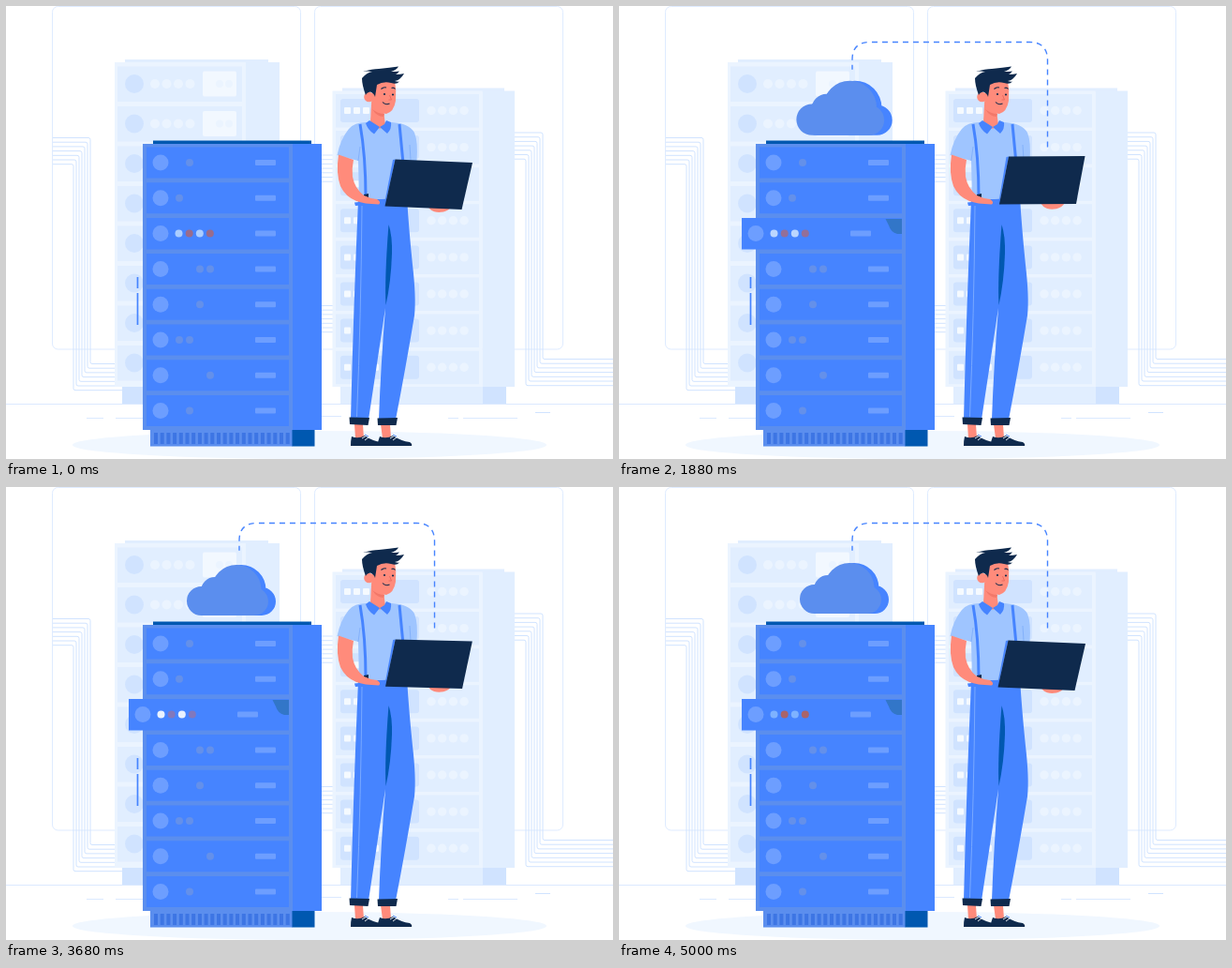
Write an HTML page with a canvas that moves like this. It is 648 px wide and 483 px high and loops after 5040 ms.

```html
<!DOCTYPE html>
<html lang="en">
<head>
<meta charset="utf-8">
<title>Server room</title>
<style>
html, body { margin: 0; width: 100%; height: 100%; overflow: hidden; background: #fff; }
canvas { display: block; width: 648px; height: 483px; }
</style>
</head>
<body>
<canvas id="stage" width="648" height="483"></canvas>
<script>
const ctx = document.getElementById('stage').getContext('2d');
const LOOP = 5040, STEP = 40;
const BLUE = '#4684ff', FRAME = '#5b8eee', DEEP = '#0058b0', NAVY = '#0f2a4d';
const SKIN = '#ff8b7b', SHIRT = '#9fc5ff';
const PALE = '#e1eeff', PALER = '#ebf4ff', SOFT = '#d0e3ff';

const clamp = v => Math.max(0, Math.min(1, v));
const mix = (a, b, k) => a + (b - a) * k;
const smooth = u => { u = clamp(u); return u * u * (3 - 2 * u); };
const sineOut = u => Math.sin(clamp(u) * Math.PI / 2);
const blend = (a, b, k) => `rgb(${a.map((v, i) => Math.round(mix(v, b[i], k))).join(',')})`;

function rect(color, x, y, w, h, r = 0) {
  ctx.fillStyle = color;
  ctx.beginPath();
  ctx.roundRect(x, y, w, h, r);
  ctx.fill();
}
function dot(color, x, y, r) {
  ctx.fillStyle = color;
  ctx.beginPath();
  ctx.arc(x, y, r, 0, 7);
  ctx.fill();
}
function shape(color, d) {
  ctx.fillStyle = color;
  ctx.fill(new Path2D(d));
}
function line(color, d, width = 1) {
  ctx.strokeStyle = color;
  ctx.lineWidth = width;
  ctx.stroke(new Path2D(d));
}

function room() {
  for (const x of [50, 330]) {
    ctx.strokeStyle = '#deebff';
    ctx.lineWidth = 1;
    ctx.beginPath();
    ctx.roundRect(x - 0.5, 0.5, 265, 365.5, 6);
    ctx.stroke();
  }
  for (let i = 0; i < 7; i++) {
    const y = 4.7 * i, x = 3 * i;
    line(SOFT, `M50 ${140.5 + y}H${88 - x}q2 0 2 2V${379.5 + y}q0 2 2 2H126`);
    line(SOFT, `M543 ${135 + y}H${571 - x}q2 0 2 2V${374.5 + y}q0 2 2 2H648`);
    line(SOFT, `M336 ${159 + y}H349M336 ${319.5 + y}H349`);
  }
  line('#dbe9ff', 'M0 424.5H648');
  line('#dbe9ff', 'M86 439.5h18M117 439.5h30M336 437.5h22M472 439.5h11M488 439.5h58');
  line(SOFT, 'M565 433.5h16');
  ctx.fillStyle = '#f0f7ff';
  ctx.beginPath();
  ctx.ellipse(324, 468, 253, 15, 0, 0, 7);
  ctx.fill();
}

function leftRack() {
  rect(PALE, 127, 57, 153, 4);
  rect(PALER, 116, 60, 140, 346);
  rect(PALE, 256, 60, 36, 346);
  rect(SOFT, 124, 406, 60, 18);
  for (let i = 0; i < 8; i++) {
    const y = 83 + 42.5 * i;
    rect(PALE, 119, y - 18.5, 133, 37.5);
    dot(SOFT, 137, y, 10);
    for (const x of [159, 171.5, 184, 196.5]) dot(PALER, x, y, 5);
    rect('#f2f8ff', 210, y - 13.5, 36, 27, 2);
    dot(PALER, 228, y, 4);
    dot(PALER, 238, y, 4);
  }
}

function rightRack() {
  rect(PALE, 359, 87.5, 173, 4);
  rect(PALER, 348.5, 90.5, 160, 315.5);
  rect(PALE, 508.5, 90.5, 34.5, 315.5);
  rect(PALE, 357, 406, 152, 18);
  rect(SOFT, 509, 406, 25, 18);
  for (let i = 0; i < 8; i++) {
    const y = 111.5 + 39.1 * i;
    rect(PALE, 352, y - 17.5, 153, 35.5);
    rect(SOFT, 357, y - 12.5, 84, 25, 3);
    for (let k = 0; k < 4; k++) {
      rect('#f5faff', 361 + 10 * k, y - 3.5, 7, 7, 1);
      dot(PALER, 454 + 11.7 * k, y, 4.7);
    }
  }
}

function unit(y) {
  dot('#6d9eff', 165, y, 8.5);
  rect('#6d9eff', 266, y - 3, 22, 6, 1);
}

function frontRack(slide, glow) {
  rect(DEEP, 157, 143.5, 169, 4);
  rect(FRAME, 146, 147, 160, 305);
  rect(BLUE, 306, 147, 31, 305);
  rect(FRAME, 154, 452, 152, 17.5);
  rect(DEEP, 305.5, 452, 24, 17.5);
  for (let i = 0; i < 22; i++) rect('#3d75e4', 158 + 6.7 * i, 455, 4, 12);
  line(BLUE, 'M140.5 289V301M140.5 306V340', 1.7);

  const lamps = [[196], [185], [], [207, 218], [207], [185, 196], [218], [196]];
  lamps.forEach((xs, i) => {
    const y = 167 + 37.8 * i;
    if (i === 2) return;
    rect(BLUE, 150, y - 16.5, 152, 33);
    unit(y);
    xs.forEach(x => dot('#6490ea', x, y, 4));
  });

  const light = blend([118, 173, 255], [255, 255, 255], glow);
  const red = blend([172, 98, 100], [122, 124, 204], glow);
  ctx.save();
  ctx.beginPath();
  ctx.rect(0, 200, 302, 80);
  ctx.clip();
  ctx.translate(-slide, 0);
  rect(BLUE, 150, 226, 180, 33.5);
  shape('#3276c8', 'M303.5 227H330V243H316Q309 241 307 234Z');
  unit(242.5);
  [184.5, 195.7, 206.8, 217.8].forEach((x, i) => dot(i % 2 ? red : light, x, 242.5, 4));
  ctx.restore();
}

function link(progress) {
  const length = 335 * progress, dashes = [];
  for (let at = 0; at < length; at += 11) dashes.push(Math.min(6, length - at), 5);
  if (!dashes.length) return;
  dashes[dashes.length - 1] = 999;
  ctx.setLineDash(dashes);
  line(BLUE, 'M457.5 150.5V58Q457.5 38.5 438 38.5H268Q249 38.5 249 57V70', 1.4);
  ctx.setLineDash([]);
}

function cloudBody(color, dx, right) {
  ctx.fillStyle = color;
  ctx.beginPath();
  ctx.arc(209.5 + dx, 118.5, 15.5, 0, 7);
  ctx.closePath();
  ctx.moveTo(239 + dx, 108);
  ctx.arc(224 + dx, 108, 15, 0, 7);
  ctx.moveTo(273 + dx, 106.5);
  ctx.arc(247 + dx, 106.5, 26.5, 0, 7);
  ctx.moveTo(right, 119);
  ctx.arc(right - 15, 119, 15, 0, 7);
  ctx.rect(209 + dx, 110, right - 224 - dx, 24);
  ctx.fill();
}

function cloud(scale, bob) {
  if (scale <= 0.01) return;
  const grown = clamp((scale - 0.7) / 0.3);
  ctx.save();
  if (grown < 1) ctx.filter = `blur(${(1.3 * (1 - grown)).toFixed(2)}px)`;
  ctx.translate(240, 108 + bob);
  ctx.scale(scale, scale);
  ctx.translate(-241, -107);
  cloudBody(BLUE, 5 * grown, 281 + 8 * grown);
  cloudBody(FRAME, 0, 281);
  ctx.restore();
}

function legs() {
  shape(SKIN, 'M372 446H381L382 461H373ZM400 446H410L411 461H402Z');
  shape(NAVY, 'M369 459Q376 462 383 458Q391 464 401 465Q404 467 403 469H368Q368 463 369 459Z');
  shape(NAVY, 'M399 459Q406 462 413 458Q422 464 431 465Q434 467 433 469H397Q397 463 399 459Z');
  line('#fff', 'M380 461l5 -3M383 463l4 -3M410 461l5 -3M413 463l4 -3', 0.9);
  line(BLUE, 'M383 457l4 2M413 457l4 2', 0.9);
  shape(BLUE, 'M376 207L428 204Q430 237 434 276Q438 310 436 330Q427 384 416 441H398Q400 384 405 322L387 441H368Q371 320 376 207Z');
  shape(DEEP, 'M408.5 233Q412.5 245 412 264Q411 294 405.5 319Q404 290 408.5 233Z');
  line('#79a9ff', 'M380 213Q379 330 374.5 438', 1);
  shape(NAVY, 'M366.5 438.5L388 439L386.5 447L367 446ZM396.5 439.5L418 439L416.5 447H397Z');
}

function body() {
  shape(SHIRT, 'M384 124Q372 124 366 131Q357 142 353.5 159L376 165L377 207L432 204L432 165L438.5 165Q440 145 436 135Q430 125 412 124Z');
  line('#83b1fb', 'M376 165L378 150M432 164L431 148', 1);
  line(BLUE, 'M378 126Q384 160 384 204M420 126L424 168', 3);
  shape(NAVY, 'M382 201l5 -1v5l-5 1Z');
  shape(BLUE, 'M372 209.5L428 204V209L373 213Z');
  shape(SKIN, 'M390 104L403 111L405 127L399 131L389 124Z');
  shape(BLUE, 'M388 122L384 125Q386 132 393 136.5L399 129ZM404 126L399 129L407 136Q412 131 411 124L406 122Z');
}

function head() {
  dot(SKIN, 387.5, 97, 5.3);
  shape(SKIN, 'M392 82L415 80Q417 90 416 101Q414 113 406 115Q395 115 390 104Z');
  shape('#f27869', 'M391 110Q397 115 404 115L403 118Q396 118 391 110Z');
  shape(NAVY, 'M380 77Q385 71 391 70Q385 69 381 70Q391 67 398 67Q410 65.5 419 64.5Q417 68 411 70Q416 70 420 69.5Q418 72 416 73Q421 73 425 72Q421 79 415 80Q418 81 420 80.5Q417 84 411 82Q403 80 396 84L394 97Q393 93 389 91.5Q385 92 384 95Q380 84 380 77Z');
  dot(NAVY, 404, 94, 1.1);
  dot(NAVY, 413, 94.5, 1.1);
  line(NAVY, 'M400.5 88.5Q403 86 406 87M411.5 87.5Q414 86.5 415.5 88.5', 1.1);
  line('#e8695f', 'M409.5 95L411.5 100H408.5', 0.9);
  line(NAVY, 'M402 102.5Q405 106 409.5 104', 1.1);
}

function arm(lift) {
  shape(SKIN, 'M355 158.5Q352 178 357 192Q362 203 374 208Q382 211 398 211.5Q401 209 396 206Q388 205 382 202Q372 194 370 182Q369 173 371 164Z');
  ctx.save();
  ctx.translate(0, -3.2 * lift);
  shape(SKIN, 'M448 211L476 213Q473 218 467 219.5Q458 221 453 217Z');
  ctx.restore();
}

function laptop(lift) {
  const from = [[415.5, 163.5], [498, 167], [486.5, 217], [404.5, 213.5]];
  const to = [[416, 160.5], [497.5, 160], [488, 211], [406, 211.5]];
  const p = from.map(([x, y], i) => [mix(x, to[i][0], lift), mix(y, to[i][1], lift)]);
  const left = p[0][0] - 2.5, foot = p[3][0] - 1;
  shape(BLUE, `M${left} ${p[0][1] + 0.5}L${p[0]}L${p[3]}L${foot} ${p[3][1]}Z`);
  shape(NAVY, `M${p.join('L')}Z`);
}

function draw(time) {
  const t = Math.floor(time % LOOP / STEP) * STEP;
  const slide = 19 * sineOut((t - 1180) / 720);
  const glow = 0.53 - 0.47 * Math.cos(2 * Math.PI * (t / 960 - 0.2));
  const lift = t < 2000 ? smooth(t / 2000) : 1 - smooth((t - 2000) / 2800);
  const scale = t < 1640
    ? 1.22 * sineOut((t - 1150) / 490)
    : mix(1.22, 1, smooth((t - 1640) / 400));
  const bob = 1 - Math.cos(2 * Math.PI * (t - 2400) / 2520);

  ctx.fillStyle = '#fff';
  ctx.fillRect(0, 0, 648, 483);
  room();
  leftRack();
  rightRack();
  frontRack(slide, glow);
  link(smooth(t / 1060));
  cloud(scale, bob);
  legs();
  body();
  head();
  arm(lift);
  laptop(lift);
}

const start = performance.now();
function tick() {
  draw(performance.now() - start);
  requestAnimationFrame(tick);
}
tick();
</script>
</body>
</html>
```
